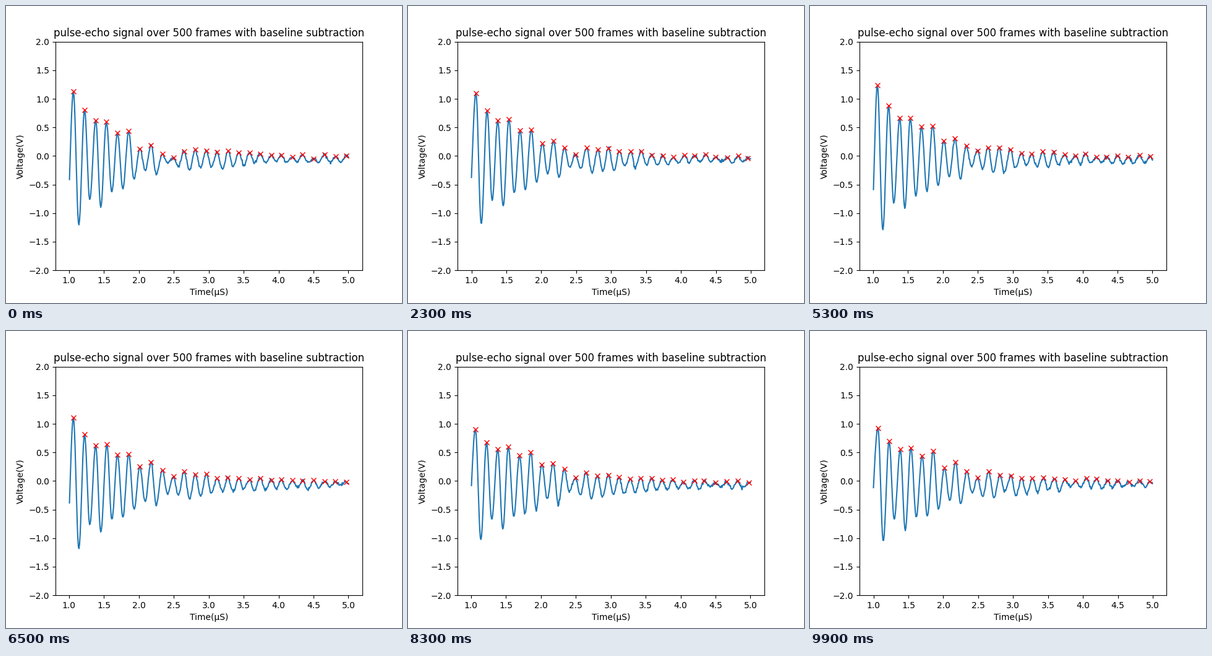
Animation, 640 px wide and 480 px high, one loop 10000 ms. Source, as a matplotlib script:

```python
import numpy as np
import matplotlib.pyplot as plt
from matplotlib.animation import FuncAnimation

FRAMES, STEP = 100, 100
SAMPLES, RECORD = 500, 3.994   # points and length (µs) of one record
CYCLES = 26

# Half cycles: even entries are crests, odd ones troughs
half = np.arange(2 * CYCLES) / 2
sign = np.where(half % 1 == 0, 1, -1)

# The first ten cycles overlap two echoes; the rest simply decay
CRESTS = [1.07, .78, .60, .62, .45, .47, .21, .27, .15, .04]
TROUGHS = [-1.16, -.75, -.88, -.65, -.59, -.47, -.32, -.37, -.19, -.22]


def rest_volts():
    late = np.arange(CYCLES - 10)
    volts = np.empty(half.size)
    volts[::2] = np.append(CRESTS, .15 * np.exp(-late / 5) - .01)
    volts[1::2] = np.append(TROUGHS, -.08 - .2 * np.exp(-late / 6))
    return volts


REST = rest_volts()
TIMES = 1.062 + .1561 * half + .025 * np.sin(np.pi * half / 25) ** 2


def swing_at(i):
    """Slow drift of the first pulse plus a shot-to-shot wobble."""
    drift = np.interp(i, [0, 23, 38, 53, 85, 99], [.16, .03, .07, .17, -.19, -.04])
    return drift - .12 * np.sin(2 * np.pi * (i + 1) / 3)


def make_signal(i):
    rng = np.random.default_rng(500 + i)
    start = 1.0 if i % 19 == 4 else 1.006
    t = np.linspace(start, start + RECORD, SAMPLES)

    # Swing moves the first cycles, growth the middle ones
    swing = swing_at(i)
    growth = .035 - .11 * np.exp(-i / 15)
    gain = swing * np.exp(-half / 2) + growth * np.exp(-((half - 7) / 3.5) ** 2)
    knots_v = REST + sign * gain + rng.normal(0, 1, half.size) * np.minimum(.02, half * .004)
    knots_t = TIMES + rng.normal(0, 1, half.size) * half * .0002

    # Put crests on samples, then join all knots by half cosines
    at = np.clip(np.searchsorted(t, knots_t[::2]), 0, SAMPLES - 1)
    knots_t[::2] = t[at]
    k = np.clip(np.searchsorted(knots_t, t, side="right") - 1, 0, half.size - 2)
    u = (t - knots_t[k]) / (knots_t[k + 1] - knots_t[k])
    v = knots_v[k] + (knots_v[k + 1] - knots_v[k]) * (1 - np.cos(np.pi * u)) / 2

    # Rising front before the first crest
    lead = t < knots_t[0]
    theta = np.arccos((-.33 - 1.5 * swing) / knots_v[0])
    v[lead] = knots_v[0] * np.cos(theta * (knots_t[0] - t[lead]) / (knots_t[0] - start))

    noise = rng.normal(0, 1, SAMPLES) * np.clip(.012 * (t - 1), .002, .013)
    noise[at] = 0
    return t, v + noise, at


fig, ax = plt.subplots(figsize=(6.4, 4.8), dpi=100)
line, = ax.plot([], [], color="tab:blue")
marks, = ax.plot([], [], "x", color="red")
ax.set_ylim(-2, 2)
ax.set_title("pulse-echo signal over 500 frames with baseline subtraction")
ax.set_xlabel("Time(µS)")
ax.set_ylabel("Voltage(V)")


def update(i):
    t, v, at = make_signal(i)
    line.set_data(t, v)
    marks.set_data(t[at], v[at])
    pad = .05 * RECORD
    ax.set_xlim(t[0] - pad, t[-1] + pad)
    return line, marks


anim = FuncAnimation(fig, update, frames=FRAMES, interval=STEP, repeat=True, repeat_delay=0)
plt.show()
```
